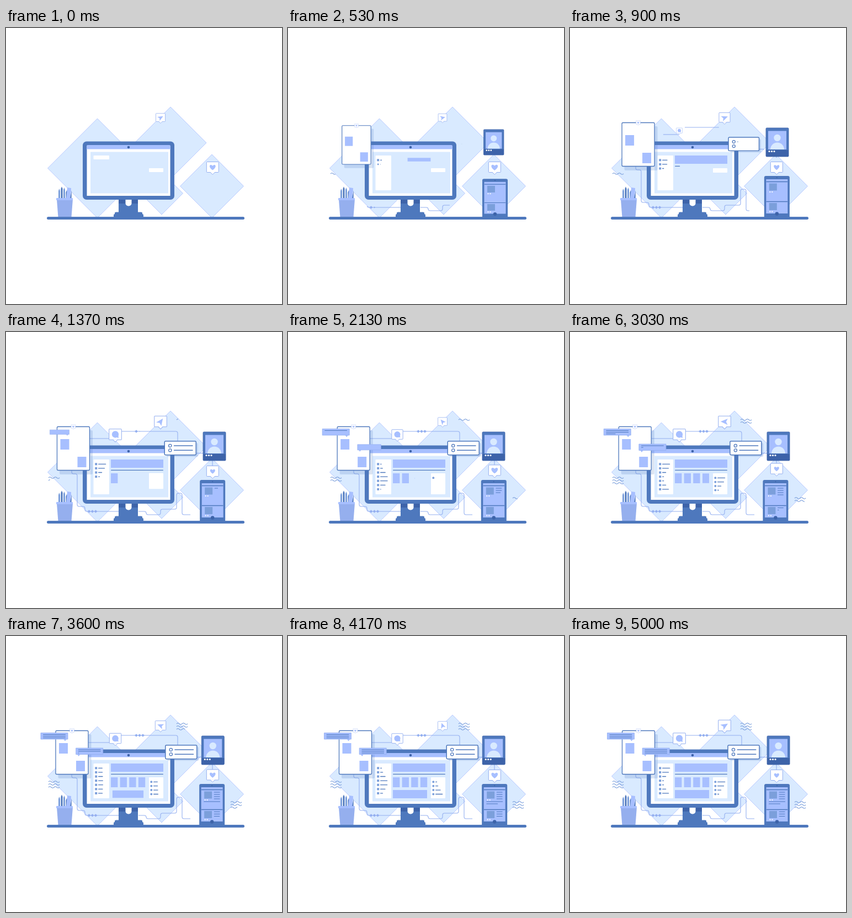
Animation, 500 px wide and 500 px high, one loop 5.03 s. Source, as an HTML page with a canvas:

```html
<!DOCTYPE html>
<html lang="en">
<head>
<meta charset="utf-8">
<title>Desk workspace</title>
<style>
html, body { margin: 0; width: 100%; height: 100%; overflow: hidden; background: #fff; }
canvas { display: block; width: 500px; height: 500px; }
</style>
</head>
<body>
<canvas id="stage"></canvas>
<script>
const LOOP = 5.03;
const PALE = '#d9eaff', SOFT = '#a7bfff', LINE = '#94aff0', MID = '#7b9fdb';
const BLUE = '#4e78bd', DEEP = '#3d63a9', WHITE = '#fff', SHADOW = 'rgba(78,120,189,0.2)';
const TAU = 2 * Math.PI;
const canvas = document.getElementById('stage');
const ctx = canvas.getContext('2d');
const dpr = window.devicePixelRatio || 1;
canvas.width = canvas.height = 500 * dpr;

const mix = (a, b, k) => a + (b - a) * k;
const ease = k => (1 - Math.cos(Math.PI * Math.max(0, Math.min(1, k)))) / 2;
const ramp = (t, start, span) => ease((t - start) / span);

function each(count, paint) {
  for (let i = 0; i < count; i++) paint(i);
}

function paintPath(fill, stroke, lw = 1) {
  if (fill) { ctx.fillStyle = fill; ctx.fill(); }
  if (stroke) { ctx.strokeStyle = stroke; ctx.lineWidth = lw; ctx.stroke(); }
}

function box(x, y, w, h, fill, r = 0, stroke, lw) {
  if (w <= 0 || h <= 0) return;
  ctx.beginPath();
  ctx.roundRect(x, y, w, h, r);
  paintPath(fill, stroke, lw);
}

function poly(pts, fill, stroke, lw) {
  ctx.beginPath();
  pts.forEach(p => ctx.lineTo(...p));
  ctx.closePath();
  paintPath(fill, stroke, lw);
}

function disc(x, y, r, fill, stroke, lw) {
  ctx.beginPath();
  ctx.arc(x, y, r, 0, TAU);
  paintPath(fill, stroke, lw);
}

const bar = (x, y, w, h = 1.3) => box(x, y - h / 2, w, h, BLUE, h / 2);

const diamond = (x, y, r, fill, stroke) =>
  poly([[x, y - r], [x + r, y], [x, y + r], [x - r, y]], fill, stroke, 0.8);

// Box that pops out of its own centre.
const pop = (x, y, w, h, k, fill) =>
  box(x + w * (1 - k) / 2, y + h * (1 - k) / 2, w * k, h * k, fill);

// Paints in a moved, scaled frame whose origin is the pivot.
function at(x, y, sx, sy, paint) {
  if (sx < 0.005 || sy < 0.005) return;
  ctx.save();
  ctx.translate(x, y);
  ctx.scale(sx, sy);
  paint();
  ctx.restore();
}

// Right-angled line with round corners; steps alternate across and down.
function wire(x, y, k, ...steps) {
  if (k <= 0) return;
  const pts = [[x, y]];
  let len = 0;
  steps.forEach((d, i) => {
    if (i % 2) y += d; else x += d;
    len += Math.abs(d);
    pts.push([x, y]);
  });
  ctx.beginPath();
  ctx.moveTo(...pts[0]);
  for (let i = 1; i < pts.length - 1; i++) ctx.arcTo(...pts[i], ...pts[i + 1], 3.5);
  ctx.lineTo(x, y);
  ctx.setLineDash([len * k, len + 9]);
  paintPath(null, LINE, 1.1);
  ctx.setLineDash([]);
}

function waves(t, x, y, start, gap) {
  each(3, row => {
    const w = 20 * ramp(t, start + row * gap, 0.6);
    ctx.beginPath();
    for (let i = 0; i <= w; i++) ctx.lineTo(x + i, y + row * 5 - 1.3 * Math.sin(i * 0.63));
    if (w > 1) paintPath(null, MID, 1.1);
  });
}

function heart(s) {
  ctx.beginPath();
  ctx.moveTo(0, s);
  ctx.bezierCurveTo(-s * 1.9, -s * 0.3, -s * 0.9, -s * 1.5, 0, -s * 0.55);
  ctx.bezierCurveTo(s * 0.9, -s * 1.5, s * 1.9, -s * 0.3, 0, s);
  paintPath(SOFT);
}

// Square speech bubble with its tail below.
function bubble(x, y, k, icon) {
  at(x, y, k, k, () => {
    box(-11, -10, 22, 19, WHITE, 1, LINE);
    poly([[-4, 8.4], [0, 13], [4, 8.4]], WHITE);
    ctx.beginPath();
    ctx.moveTo(-4, 9);
    ctx.lineTo(0, 13);
    ctx.lineTo(4, 9);
    paintPath(null, LINE);
    icon();
  });
}

function backdrop() {
  const edge = '#aebfff';
  diamond(165.5, 254, 90, PALE, edge);
  diamond(298, 208, 65, PALE, edge);
  diamond(282, 299.5, 38.5, PALE, edge);
  diamond(373, 286.5, 57.5, PALE, edge);
}

function desk() {
  each(4, i => {
    const x = 95 + i * 4.5, top = 291 - 4 * Math.sin(i * 1.3);
    poly([[x, 309], [x, top + 4], [x + 1.5, top], [x + 3, top + 4], [x + 3, 309]], i % 2 ? BLUE : MID);
  });
  poly([[109, 309], [111, 289], [118, 290], [117, 309]], SOFT);
  poly([[116, 309], [119, 294], [118.5, 309]], BLUE);
  poly([[92, 310], [121, 310], [118.5, 343], [94.5, 343]], '#95afee');
  box(91, 308, 30, 4, SOFT, 1);
  box(74, 342, 358, 5, BLUE, 2.5);
}

function monitor() {
  box(204, 310, 35, 26, BLUE);
  box(204, 310, 35, 8, DEEP);
  box(216.5, 310, 11, 12.5, WHITE, [0, 0, 5, 5]);
  box(197, 333.5, 50, 6, BLUE, 2);
  box(195, 337, 54, 7, BLUE, 2);
  box(139, 205.5, 166, 105.5, BLUE, 7);
  box(146, 212, 152, 8, SOFT, [2, 2, 0, 0]);
  disc(222, 216, 2.3, DEEP);
  box(146.5, 219.5, 151, 84.5, WHITE);
  box(153, 224.5, 141, 75, PALE);
}

function screen(t, sway) {
  const width = i => 8.5 + 6 * sway * Math.cos(i * 0.9);

  box(158.5, 231, 28.5, mix(7, 63, ramp(t, 0, 0.5)), WHITE, 1);
  each(7, i => {
    const y = 239.3 + i * 7.6, start = 0.1 + i * 0.31;
    pop(161.2, y - 2, 4, 4, ramp(t, start, 0.2), MID);
    bar(167, y, width(i) * ramp(t, start + 0.05, 0.3));
  });

  pop(190, 231, 95, 15, ramp(t, 0.3, 0.5), SOFT);
  bar(190, 250.3, 95 * ramp(t, 0.8, 0.5));
  each(4, i => pop(190 + i * 16.6, 256, 12.4, 18, ramp(t, 0.92 + i * 0.57, 0.45), SOFT));
  pop(190, 279, 62, 15, ramp(t, 3.2, 0.5), SOFT);

  const open = ramp(t, 0.8, 0.9);
  box(259, mix(254, 256, open), 26, mix(7, 38, open), WHITE, 1);
  each(4, i => {
    const y = 264.3 + i * 7.4, start = 1.85 + i * 0.25;
    disc(263.3, y, 2 * ramp(t, start, 0.3), MID);
    bar(267, y, width(i) * ramp(t, start + 0.25, 0.25));
  });
}

function wires(t, drift) {
  const main = ramp(t, 0.12, 1), late = ramp(t, 0.6, 0.6);
  wire(204, 325, main, -61, -9, -14, -59, -10, -17);
  wire(240, 325, main, 14, 6, 26, -10, 29, -29, 10, 39, 15);
  wire(198, 193, late, -58);
  wire(208, 180, late, 103, 20);
  wire(340 + 4 * drift, 219.5, late, 22);
  wire(374, 225, late, 0, 20);
  each(3, i => {
    diamond(150.5 + i * 6, 325, 2.8 * ramp(t, 0.2 + i * 0.15, 0.35), LINE);
    diamond(236 + i * 6, 180, 2.8 * ramp(t, 1 + i * 0.25, 0.35), LINE);
  });
}

// Label that widens from one end; side is -1 for leftwards, 1 for rightwards.
function label(t, x, y, side, start) {
  const k = ramp(t, start, 0.5);
  at(x, y, k, k, () => {
    const left = side < 0 ? -49 : 0;
    poly([[side * 5 - 3, 5], [side * 5 + 3, 5], [side * 5, 9]], SOFT);
    box(left, -6, 49, 11.5, SOFT, 0, LINE, 0.8);
    each(3, i => bar(left + 4, -3 + i * 3, 41 * ramp(t, start + 0.6 + i * 0.6, 0.4), 1.2));
  });
}

function sheet(t, drift) {
  const x = 124 - 6.5 * drift, k = ramp(t, 0.1, 0.55);
  at(x, mix(219, 211, k), k, k, () => {
    box(-25, -33, 60, 80, SHADOW, 2);
    box(-29.5, -39.5, 59, 79, WHITE, 2, BLUE, 1.3);
    box(-23.5, -17, 16, 19, SOFT);
    box(7.5, 15, 16, 19, SOFT);
    at(0, -39.5, 0.36, 0.36, () => bubble(0, 0, 1, () => heart(5)));
  });
  label(t, x - 7.5, 181.5, -1, 1.05);
  label(t, x + 7.2, 209, 1, 1.75);
}

function sideCard(t, drift) {
  const k = ramp(t, 0.48, 0.47);
  at(314.5 + 4 * drift, 210, k, k, () => {
    box(-25, -9, 57, 25, SHADOW, 2);
    box(-28.5, -12.3, 57, 25, WHITE, 2, BLUE, 1.5);
    each(2, i => {
      const y = -4 + i * 8.2;
      disc(-18.5, y, 2.6, WHITE, BLUE, 1.3);
      bar(-12, y, 35 * ramp(t, 0.85 + i * 0.15, 0.35), 1.5);
    });
  });
}

function photo(t, sway) {
  const k = ramp(t, 0.1, 0.55);
  at(375 + 2.6 * sway, 207, k, k, () => {
    box(-20.5, -26, 41, 52, BLUE, 1.5, DEEP, 0.8);
    box(-20.5, 14, 41, 12, DEEP, [0, 0, 1.5, 1.5]);
    box(-16.5, -20.5, 33, 33.5, SOFT);
    disc(0, -8, 6.2, PALE);
    ctx.beginPath();
    ctx.arc(0, 13, 12.5, Math.PI, TAU);
    paintPath(PALE);
    each(3, i => disc(-14.5 + i * 4.5, 16.5, 1.6, WHITE));
  });
}

function phone(t, drift) {
  at(375 - 2.7 * drift, 343, 1, ramp(t, 0.1, 0.52), () => {
    box(-23, -75, 46, 75, BLUE, [3, 3, 1, 1]);
    disc(0, -72, 1.1, DEEP);
    box(-19.5, -69, 39, 62, SOFT);
    bar(-19.5, -64.5, 39);
    each(2, post => {
      const y = -61.5 + post * 35.5;
      box(-14, y, 14, 13, MID);
      each(2, i => disc(-12.5 + i * 4, y + 15.6, 1.1, WHITE));
      each(4 - post, i => bar(3.5, y + 1.5 + i * 4, 11 * ramp(t, 1.15 + (post * 4 + i) * 0.35, 0.4), 1.1));
    });
    each(2, i => bar(-15, -43 + i * 4, (30 - i * 9) * ramp(t, 3.1 + i * 0.5, 0.5), 1.1));
    bar(-19.5, -28.5, 39);
    disc(0, -6.5, 3.2, DEEP);
  });
}

function bubbles(t, sway, drift) {
  const beat = (1 + sway) / 2;
  const turn = -0.1 + 1.45 * Math.cos(TAU * (t - 0.53) / LOOP);
  const grow = (0.76 + 0.27 * beat) * mix(0.9, 1, ramp(t, 0.3, 0.7));
  bubble(280, 162.5, grow, () => {
    ctx.rotate(turn);
    poly([[0, -7], [5.5, 5.5], [0, 2.7], [-5.5, 5.5]], SOFT);
  });
  bubble(198, 186, ramp(t, 0.65, 0.5) * mix(0.92, 1.03, beat), () => {
    disc(0, -0.5, 6, SOFT);
    poly([[1, 4.5], [5, 1], [6, 5.5]], SOFT);
  });
  bubble(374.3, 252.5 - 5.5 * drift ** 6, 1, () => heart(mix(5.5, 4.2, beat)));
}

function draw(t) {
  const drift = t < 0.53 ? 0 : (1 - Math.cos(TAU * (t - 0.53) / 4.47)) / 2;
  const sway = Math.cos(TAU * (t - 1.3) / 1.82);
  ctx.setTransform(dpr, 0, 0, dpr, 0, 0);
  ctx.fillStyle = WHITE;
  ctx.fillRect(0, 0, 500, 500);
  backdrop();
  waves(t, 77, 264, 0.25, 0.95);
  waves(t, 309, 159, 1.2, 1);
  waves(t, 407, 301, 1.85, 0.7);
  wires(t, drift);
  desk();
  monitor();
  screen(t, sway);
  sheet(t, drift);
  sideCard(t, drift);
  phone(t, drift);
  photo(t, sway);
  bubbles(t, sway, drift);
}

const begin = performance.now();
function tick() {
  draw(((performance.now() - begin) / 1000) % LOOP);
  requestAnimationFrame(tick);
}
tick();
</script>
</body>
</html>
```
